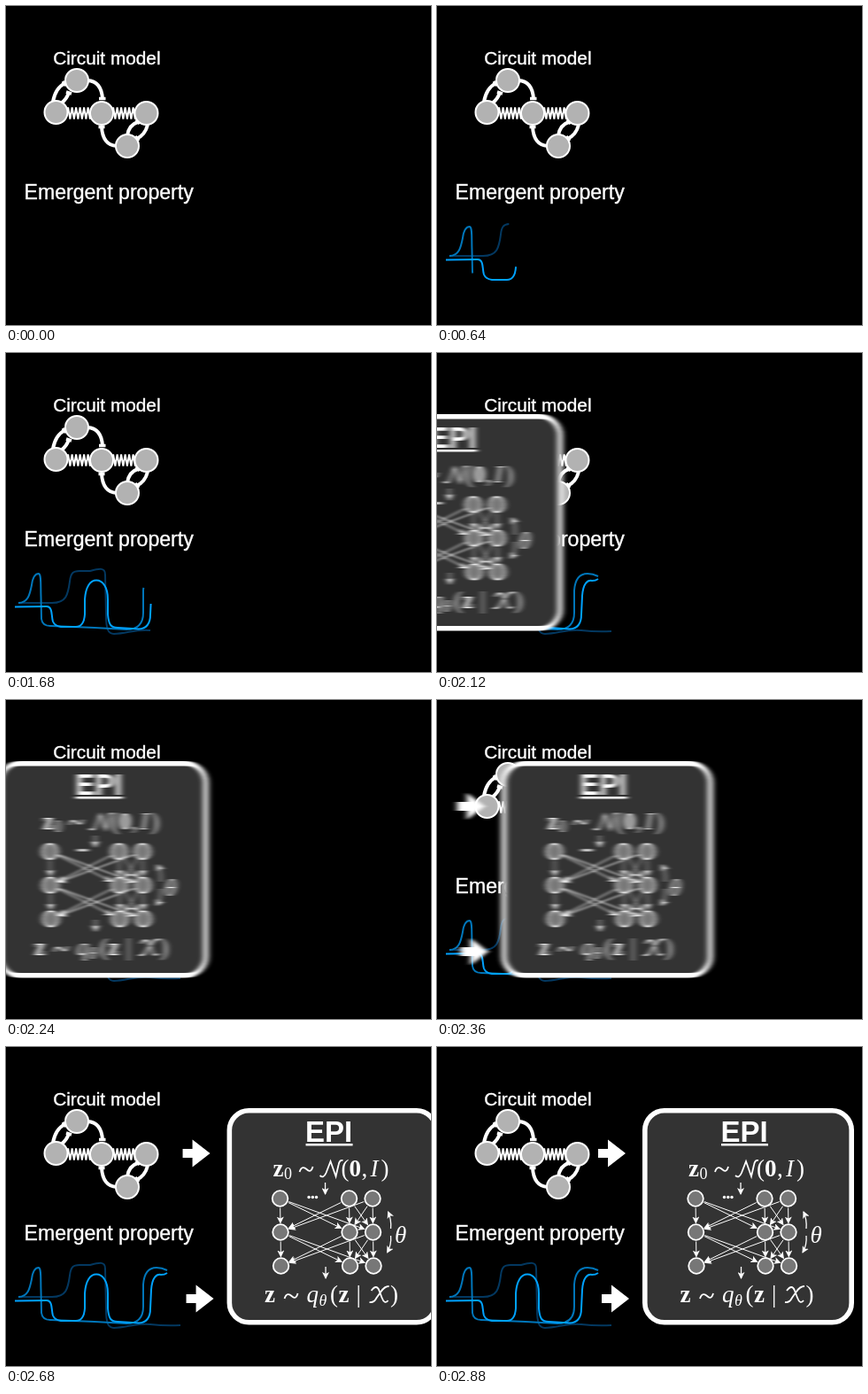
An HTML page for the animation above (2920 ms loop, 480x360 px).

```html
<!DOCTYPE html>
<html lang="en">
<head>
<meta charset="utf-8">
<title>Circuit model to EPI</title>
<style>
  html, body { margin: 0; width: 100%; height: 100%; overflow: hidden; background: #000; }
  svg { display: block; width: 480px; height: 360px; }
  text { fill: #fff; font-family: "Liberation Sans", Arial, sans-serif; }
  .label { stroke: #fff; stroke-width: 0.4; }
  .line { fill: none; stroke: #fff; }
  .math text { font-family: "Liberation Serif", "Times New Roman", serif; font-size: 27px; }
  .math .b { font-weight: bold; }
  .math .i { font-style: italic; }
  .math .sub { font-size: 18px; }
  #curves path { fill: none; stroke-width: 2; }
</style>
</head>
<body>
<svg viewBox="0 0 480 360">
  <defs>
    <filter id="smear" filterUnits="userSpaceOnUse" x="150" y="50" width="350" height="280" color-interpolation-filters="sRGB">
      <feGaussianBlur id="blur" stdDeviation="0 0"/>
    </filter>
    <marker id="tip" viewBox="0 0 8 8" refX="7" refY="4" markerWidth="8" markerHeight="8" markerUnits="userSpaceOnUse" orient="auto">
      <path d="M0 0L8 4L0 8L2 4Z" fill="#fff"/>
    </marker>
  </defs>

  <text class="label" x="53.2" y="66" font-size="20.8">Circuit model</text>
  <text class="label" x="20.5" y="217.5" font-size="23.1">Emergent property</text>

  <g class="line" stroke-width="4">
    <path d="M92 84Q108 85 109 105M108 136Q109 157 125 158"/>
    <path d="M53 108Q56 92 67 87M62 110Q69 105 71 97M137 146Q139 134 149 131M147 150Q157 146 160 134"/>
    <path d="M105 104.500H112.500M104.500 136.500H111.500M64 85L68 90M68 97L74 99M147 128L151 133M146 147L150 152" stroke-width="3.500"/>
    <path id="zigzags" stroke-width="2"/>
  </g>
  <g id="cells" fill="#b2b2b2" stroke="#fff" stroke-width="2"></g>

  <g id="curves">
    <path pathLength="1" stroke="#033860" d="M14 282H52C68 282 70 273 72 258C73 248 76 246 83 246H95C106 243 112 242 112 250L113 295C113 311 115 317 122 317C136 317 147 311 163 313Q180 315 197 314"/>
    <path pathLength="1" stroke="#0076ba" d="M14 282C25 282 27 272 29 262C30 254 33 249 37 249C40 250 39 262 39.500 275L40 300Q41 308 50 308L100 310L136 312C148 312 155 306 155 293V268C156 254 162 249 170 249Q176 249 182 252"/>
    <path pathLength="1" stroke="#00a2ff" d="M10 286.500L46 286C53 286 51 297 53 303Q55 308 62 309H79Q88 309 89 295V278C90 264 95 256.500 102 256.500C109 256.500 115 264 115 278V295C116 306 118 310 126 310L150 311.500C160 311 163 303 163 295L164 274C165 260 170 256 175 257Q179 257 182 255"/>
  </g>

  <g id="mover">
    <g filter="url(#smear)">
      <path id="arrow" fill="#fff" d="M182 115H193V104.500L213 120L193 135.500V125H182Z"/>
      <use href="#arrow" x="4" y="164"/>
      <rect x="234.800" y="71.800" width="233.400" height="239" rx="22" fill="#333" stroke="#fff" stroke-width="5.600"/>
      <text x="320.500" y="107" font-size="33" font-weight="bold">EPI</text>
      <rect x="321" y="109" width="53" height="2.500" fill="#fff"/>

      <g class="math">
        <text y="146"><tspan class="b" x="284">z</tspan><tspan class="sub" x="296.500" dy="3">0</tspan><tspan x="361" dy="-3">(</tspan><tspan class="b" x="370">0</tspan><tspan x="384">,</tspan><tspan class="i" x="394">I</tspan><tspan x="406">)</tspan></text>
        <text y="288"><tspan class="b" x="274.500">z</tspan><tspan class="i" x="322">q</tspan><tspan class="i sub" x="336" dy="4">θ</tspan><tspan x="348.500" dy="-4">(</tspan><tspan class="b" x="358">z</tspan><tspan x="378">|</tspan><tspan x="416.500">)</tspan></text>
        <text class="i" x="421.500" y="220.500">θ</text>
        <g class="line" stroke-width="1.8">
          <path id="tilde" d="M314 141C316 134 320 136 322 138S327 142 329 135"/>
          <use href="#tilde" x="-17" y="143"/>
          <path d="M337 145Q341 149 344 142L349 129L355 146L358 133Q359 127 363 128"/>
          <path d="M395 275Q401 267 404 275L407 283Q410 291 414 286M415 270Q410 270 406 276L401 283Q398 289 393 288"/>
        </g>
      </g>

      <g id="links" class="line" stroke-width="1" marker-end="url(#tip)"></g>
      <g class="line" stroke-width="1.3">
        <path marker-end="url(#tip)" d="M343 153V166"/>
        <path marker-end="url(#tip)" d="M343.500 248V261"/>
        <path marker-end="url(#tip)" d="M417 205Q418 195 414 186"/>
        <path marker-end="url(#tip)" d="M417 213Q418 223 413 232"/>
      </g>
      <g id="units" fill="#777" stroke="#fff" stroke-width="1.8"></g>
      <g fill="#fff"><circle cx="324.500" cy="169.500" r="1.7"/><circle cx="328.800" cy="169.500" r="1.7"/><circle cx="333" cy="169.500" r="1.7"/></g>
    </g>
  </g>
</svg>
<script>
const LOOP = 2920, STEP = 40, DRAW = 1920, ARRIVE = 2606.5, SETTLE = 195;
const $ = id => document.getElementById(id);

function add(parent, tag, attrs) {
  const el = document.createElementNS("http://www.w3.org/2000/svg", tag);
  for (const k in attrs) el.setAttribute(k, attrs[k]);
  parent.append(el);
}

function zigzag(x0, x1) {
  let d = `M${x0} 121`;
  const n = 12, dx = (x1 - x0) / n;
  for (let i = 0; i < n; i++) d += `L${x0 + (i + 0.5) * dx} ${i % 2 ? 127.5 : 114.5}`;
  return d + `L${x1} 121`;
}
$("zigzags").setAttribute("d", zigzag(69, 96) + zigzag(120, 147));

for (const [cx, cy] of [[56.5, 120], [80, 84], [108, 121], [158.5, 121], [137, 158]])
  add($("cells"), "circle", { cx, cy, r: 13 });

// Fully connected layers, drifting slightly right; links stop short of the circles
const cols = [292, 370, 396.5], rows = [171, 209, 247], drift = 0.5;
rows.forEach((cy, r) => {
  for (const col of cols) {
    const cx = col + r * drift;
    add($("units"), "circle", { cx, cy, r: 8.8 });
    if (r === 2) continue;
    for (const next of cols) {
      const dx = next + drift - (col + 0), dy = rows[r + 1] - cy, k = 10.5 / Math.hypot(dx, dy);
      add($("links"), "line", { x1: cx + dx * k, y1: cy + dy * k, x2: cx + dx * (1 - k), y2: cy + dy * (1 - k) });
    }
  }
});

// Slide in while slowing slightly, overshoot, then settle
function slide(t) {
  const u = t - 2120, w = t - ARRIVE;
  if (w < 0) return -329 + 0.737 * u - 0.000125 * u * u;
  if (w < SETTLE) return 0.615 * w * (1 - w / SETTLE) ** 2;
  return 0;
}

const curves = [...$("curves").children];

function draw(t) {
  const p = Math.min(1, t / DRAW);
  for (const c of curves) c.setAttribute("stroke-dasharray", `${p} 2`);
  $("mover").setAttribute("transform", `translate(${slide(t)} 0)`);
  $("mover").setAttribute("visibility", t < DRAW ? "hidden" : "visible");
  const speed = Math.abs(slide(t + 5) - slide(t - 5)) / 10;
  $("blur").setAttribute("stdDeviation", `${(speed * 4.6).toFixed(2)} 0`);
}

const start = performance.now();
function frame() {
  const t = (performance.now() - start) % LOOP;
  draw(Math.floor(t / STEP) * STEP);
  requestAnimationFrame(frame);
}
frame();
</script>
</body>
</html>
```
